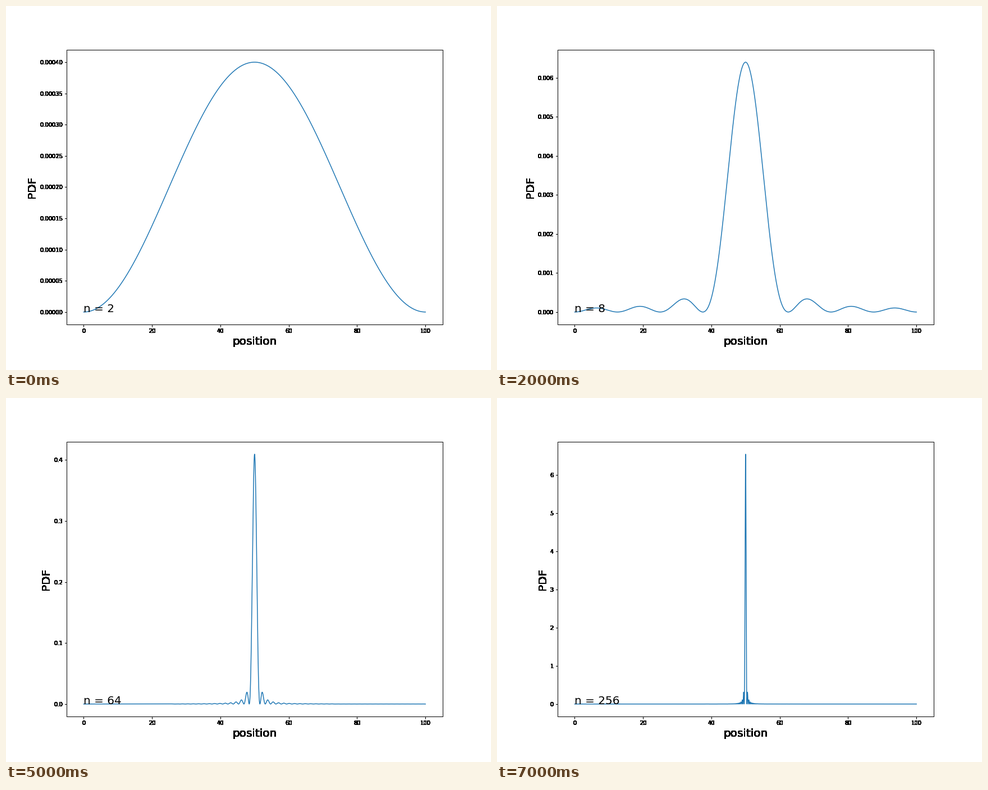
Animation of 864x648 px, one loop 8 s. Source, as a matplotlib script:

```python
import numpy as np
import matplotlib.pyplot as plt
from matplotlib.animation import FuncAnimation

FRAMES = 8
X = np.linspace(0, 100, 10000)


def pdf(n):
    """Interference of n equal waves, peaking at the middle of the box."""
    half_phase = np.pi * (X - 50) / 100
    return 1e-4 * (np.sin(n * half_phase) / np.sin(half_phase)) ** 2


def harden(image, dpi):
    """Turn every touched pixel solid black, leaving no soft edges."""
    solid = np.zeros_like(image)
    solid[..., 3] = image[..., 3] > 0
    return solid, 0, 0


fig, ax = plt.subplots(figsize=(12, 9), dpi=72, facecolor="white")
fig.subplots_adjust(left=0.125, right=0.9, bottom=0.125, top=0.88)
line, = ax.plot(X, pdf(2), color="#1f77b4", lw=1.5)
count = ax.text(0, 0, "", fontsize=20)
ax.set_xlabel("position", fontsize=20)
ax.set_ylabel("PDF", fontsize=20)

for artist in (ax.xaxis, ax.yaxis, *ax.spines.values()):
    artist.set_agg_filter(harden)


def update(i):
    n = 2 ** (i + 1)
    line.set_ydata(pdf(n))
    count.set_text(f"n = {n}")
    ax.relim()
    ax.autoscale_view()
    return line, count


anim = FuncAnimation(fig, update, frames=FRAMES, interval=1000,
                     init_func=lambda: update(0), repeat=True, repeat_delay=0)
plt.show()
```
